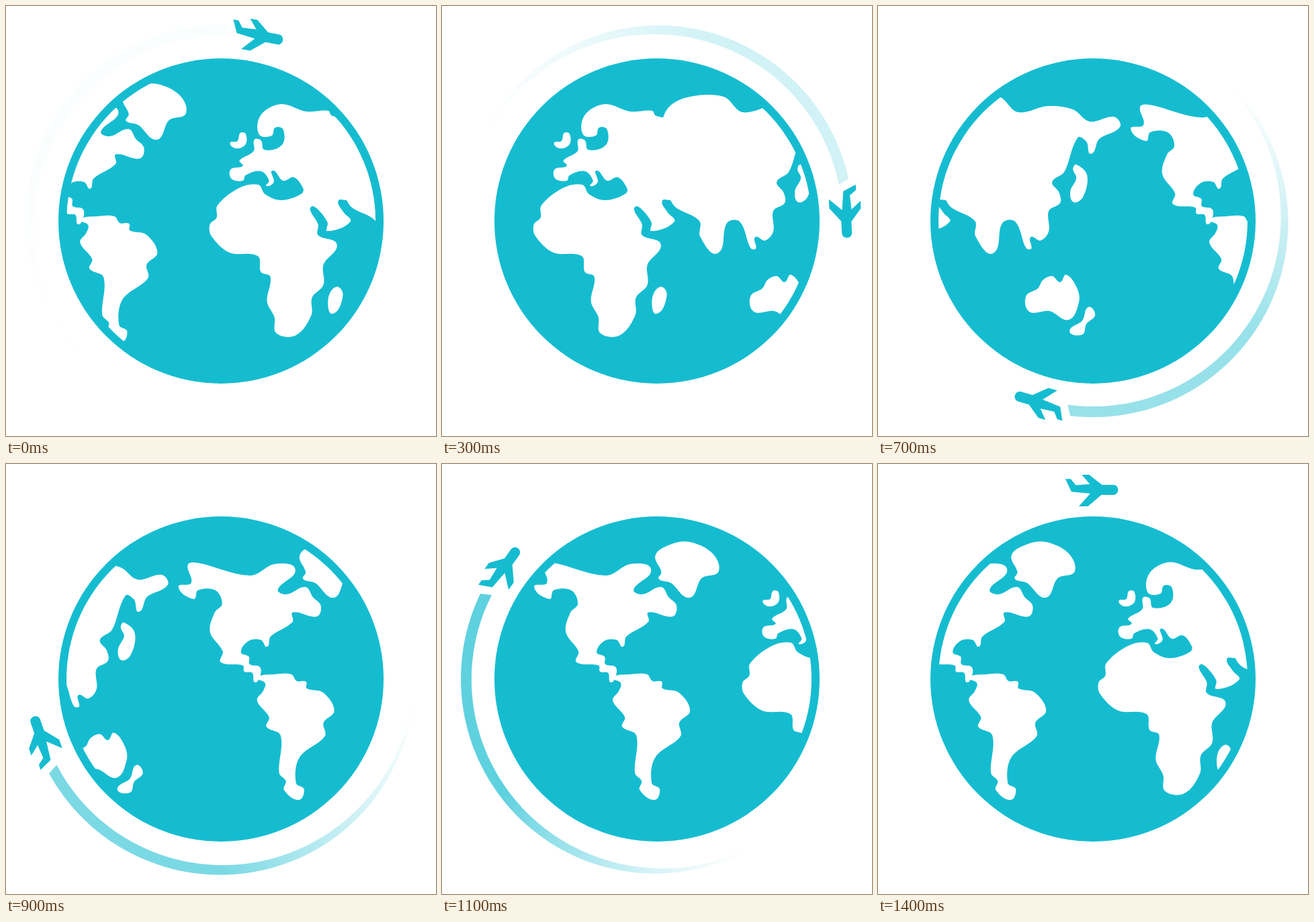
An HTML page with a canvas that plays this animation: 640 by 640 pixels, repeating every 1.8 s.

```html
<!DOCTYPE html>
<html lang="en">
<head>
<meta charset="utf-8">
<title>Round the world</title>
<style>
  html, body { margin: 0; width: 100%; height: 100%; overflow: hidden; background: #fff; }
  canvas { display: block; width: 100vmin; height: 100vmin; }
</style>
</head>
<body>
<canvas id="stage" width="640" height="640"></canvas>
<script>
const ctx = document.getElementById('stage').getContext('2d');
const BLUE = '#15bcd0';
const LOOP = 1800, STEP = 100, LAST = 14, TRAIL_END = 12;
const WORLD = 788.5;   // width of the map strip
const RAD = Math.PI / 180;

// Closed smooth coastline through a few key points "x,y x,y ...", shifted by dx
function coast(dx, text) {
  const pts = text.trim().split(/\s+/).map(s => s.split(',').map(Number));
  const n = pts.length, at = i => pts[(i + n) % n];
  const tangent = i => {
    const a = at(i - 1), b = at(i + 1);
    const len = Math.hypot(b[0] - a[0], b[1] - a[1]);
    return [(b[0] - a[0]) / len, (b[1] - a[1]) / len];
  };
  const path = new Path2D();
  path.moveTo(pts[0][0] + dx, pts[0][1]);
  for (let i = 0; i < n; i++) {
    const p = at(i), q = at(i + 1), t = tangent(i), u = tangent(i + 1);
    const k = Math.hypot(q[0] - p[0], q[1] - p[1]) * 0.33;
    path.bezierCurveTo(p[0] + t[0] * k + dx, p[1] + t[1] * k,
      q[0] - u[0] * k + dx, q[1] - u[1] * k, q[0] + dx, q[1]);
  }
  path.closePath();
  return path;
}

const WEST = -119.4, MID = 310.8, EAST = 430.2;
const lands = [
  // Greenland
  coast(0, '369,116 403,133 412,160 387,170 369,199 341,177 323,171 327,161 318,136 340,120'),
  // North America
  coast(WEST, `271,150 285,147 364,166 400,149 431,157 405,187 418,194 446,183 457,198 469,211
    463,227 427,221 427,235 394,257 389,272 380,262 362,263 350,280 362,287 363,298 378,302
    379,314 371,325 367,311 355,309 353,300 320,295 323,279 304,250 311,221 322,208 312,188
    286,188 280,201 257,183 276,177`),
  // South America
  coast(WEST, `374,318 400,313 425,313 433,323 447,324 448,334 472,340 489,367 473,385 475,405
    437,437 432,475 444,484 436,500 414,485 417,472 407,460 409,404 388,391 392,377 374,352
    383,338 386,326`),
  // Africa
  coast(MID, `137,325 139,342 166,367 208,372 213,396 227,403 222,440 233,463 236,487 265,490
    288,460 289,434 306,415 306,385 326,355 298,341 298,325 286,302 294,293 280,265 274,279
    243,289 219,280 209,266 180,271 148,297 147,315`),
  // Europe and western Asia
  coast(MID, `275,270 282,292 297,302 312,322 312,335 346,321 336,307 328,290 343,288 352,270
    350,175 318,163 313,156 280,157 243,146 213,162 210,191 229,193 234,181 246,184 244,207
    218,214 213,200 203,199 202,216 181,230 186,238 168,243 169,257 186,260 190,252 213,246
    225,260 221,268 232,262 230,245 246,260 262,255`),
  // Eastern Asia
  coast(EAST, `219,286 229,300 264,320 265,343 291,368 305,323 324,321 340,360 348,361 347,344
    362,349 374,335 374,305 391,293 389,277 379,262 397,247 417,196 430,202 437,220 449,198
    480,180 471,165 435,172 410,154 372,149 328,158 300,135 250,135 219,150 207,180 207,270`),
  // British Isles, Madagascar, Japan
  coast(MID, '190,190 190,206 176,212 167,204 178,201 182,189'),
  coast(MID, '325,418 335,430 320,458 313,436'),
  coast(EAST, '415,236 431,252 425,284 411,292 406,276 415,256 410,243'),
  // Australia, New Zealand
  coast(EAST, `340,432 358,420 365,408 379,402 391,411 400,400 416,420 419,440 404,467 375,454
    345,455`),
  coast(EAST, '433,448 443,460 430,473 424,489 405,484 424,468')
];

const plane = new Path2D(`M-40-298h8l7.500 9.500 21-1.500-12-14h11l19 15h17a7 7.500 0 0 1 0 15h-18
  l-20 17h-13.500l17-19-28-3z`);

// Tapered band behind the plane; b is the angle back from it
const LENGTH = 156;
const trail = new Path2D();
function edge(b, side) {
  const w = 16 * (1 - (b / LENGTH) ** 3);
  const r = 284 + (16 - w) * 0.2 + side * w / 2;
  trail.lineTo(-r * Math.sin(b * RAD), -r * Math.cos(b * RAD));
}
edge(9.7, 1);
for (let b = 12; b <= LENGTH; b += 2) edge(b, 1);
for (let b = LENGTH; b >= 12; b -= 2) edge(b, -1);
edge(8.5, -1);
trail.closePath();

const fade = ctx.createConicGradient((-90 - LENGTH) * RAD, 0, 0);
for (let i = 0; i <= 8; i++) {
  const a = i / 8;
  fade.addColorStop(a * (LENGTH - 72) / 360, `rgba(21,188,208,${a ** 1.4})`);
}

// Constant speed with a soft start and stop, 0 to 1
function travel(ms) {
  const total = 1560, ramp = 240;
  const s = ms + 140;
  const part = s < ramp ? s * s / (2 * ramp)
    : s > total - ramp ? total - ramp - (total - s) ** 2 / (2 * ramp)
    : s - ramp / 2;
  return part / (total - ramp);
}

function disc(r) {
  ctx.beginPath();
  ctx.arc(320, 320, r, 0, 2 * Math.PI);
}

function draw(step) {
  const p = travel(step * STEP);
  ctx.clearRect(0, 0, 640, 640);

  ctx.fillStyle = BLUE;
  disc(242);
  ctx.fill();

  ctx.save();
  disc(230);
  ctx.clip();
  ctx.fillStyle = '#fff';
  ctx.translate(668.6 - p * WORLD, 0);
  for (let i = 0; i < 2; i++) {
    lands.forEach(land => ctx.fill(land));
    ctx.translate(-WORLD, 0);
  }
  ctx.restore();

  ctx.save();
  ctx.translate(320, 320);
  ctx.rotate(p * 2 * Math.PI);
  if (step < TRAIL_END) {
    ctx.globalAlpha = 0.81 * p;
    ctx.fillStyle = fade;
    ctx.fill(trail);
    ctx.globalAlpha = 1;
  }
  ctx.fillStyle = BLUE;
  ctx.fill(plane);
  ctx.restore();
}

const start = performance.now();
let shown = -1;
function tick() {
  const step = Math.min(Math.floor((performance.now() - start) % LOOP / STEP), LAST);
  if (step !== shown) draw(shown = step);
  requestAnimationFrame(tick);
}
tick();
</script>
</body>
</html>
```
